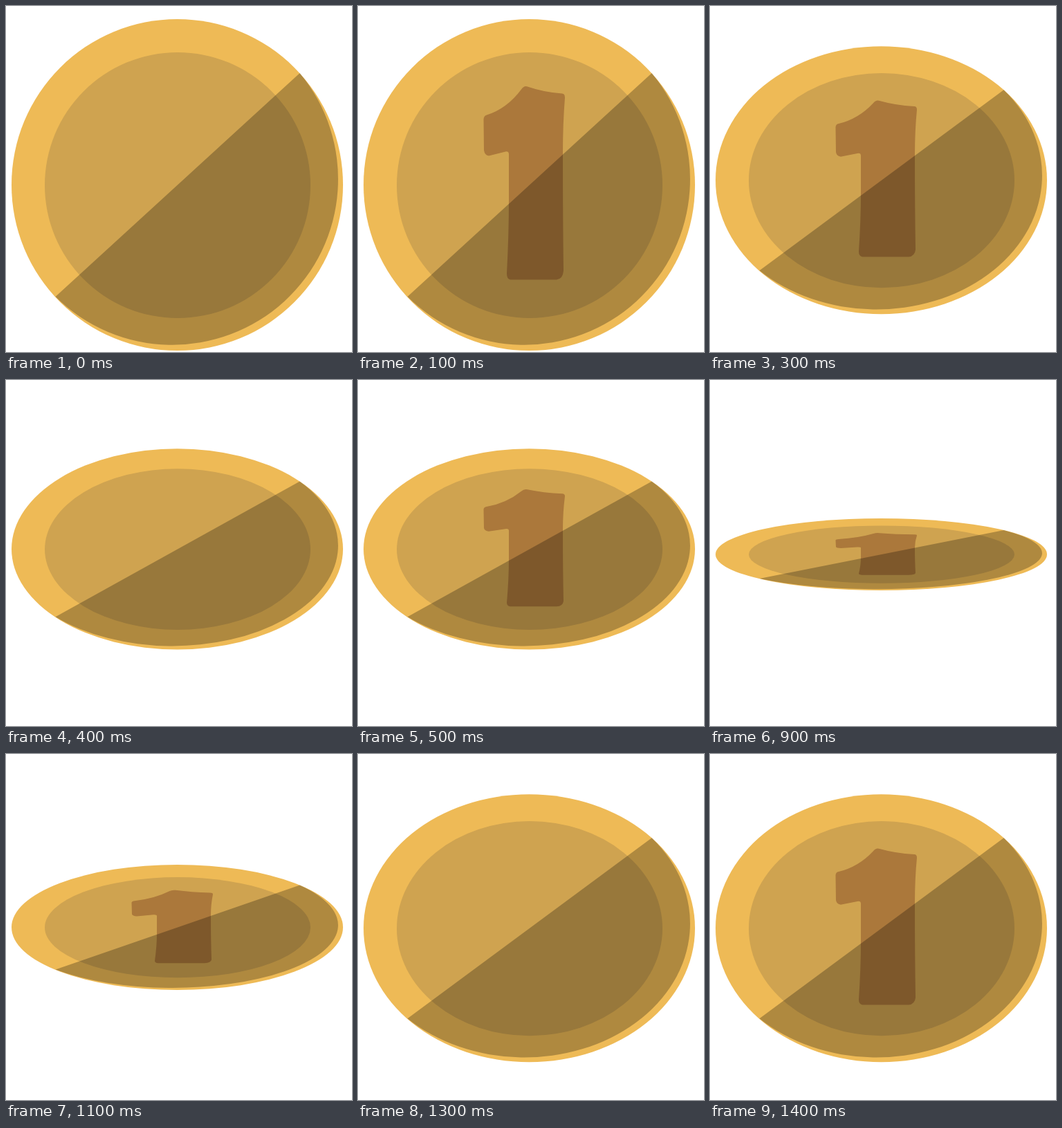
These frames come from a looping animation (500 px wide and 500 px high, 1500 ms). An HTML page:

```html
<!DOCTYPE html>
<html>
<head>
<meta charset="utf-8">
<style>
  html, body { margin: 0; width: 100%; height: 100%; overflow: hidden; background: #fff; }
  svg { display: block; width: 100vw; height: 100vh; }
</style>
</head>
<body>
<svg viewBox="0 0 500 500">
  <g id="coin">
    <circle cx="247.5" r="239.5" fill="#eeba56"/>
    <circle cx="248" cy=".5" r="192" fill="#cfa350"/>
    <path id="digit" fill="#ab783b" d="M186-101Q215-110 236-138Q240-144 245-142Q268-134 295-132Q299-132 299-126Q296-88 296-45Q296 48 297 124Q296 136 287 137L220 137Q215 136 215 128Q218 72 218 23L218-44Q218-49 213-48L189-42Q183-43 182-50L181.500-95Q182-100 186-101Z"/>
    <path fill="#000" fill-opacity=".265" d="M424.500-161.500A239.500 239.500 0 0 1 71.500 161.500Z"/>
  </g>
</svg>
<script>
  const STEP = 100;
  const coin = document.getElementById('coin');
  const digit = document.getElementById('digit');

  // Tilt poses: [centre y, vertical scale]
  const poses = {
    A: [258.5, 1],
    B: [251.7, 0.808],
    C: [244.3, 0.606],
    D: [250.5, 0.378],
    E: [252, 0.217]
  };
  // One entry per step; "1" shows the digit
  const steps = 'A A1 B B1 C C1 D1 D E E1 D D1 C B B1'.split(' ');

  function draw(now) {
    const [pose, mark] = steps[Math.floor(now / STEP) % steps.length];
    const [y, scale] = poses[pose];
    coin.setAttribute('transform', `translate(0 ${y}) scale(1 ${scale})`);
    digit.setAttribute('visibility', mark ? 'visible' : 'hidden');
    requestAnimationFrame(() => draw(performance.now()));
  }
  draw(performance.now());
</script>
</body>
</html>
```
